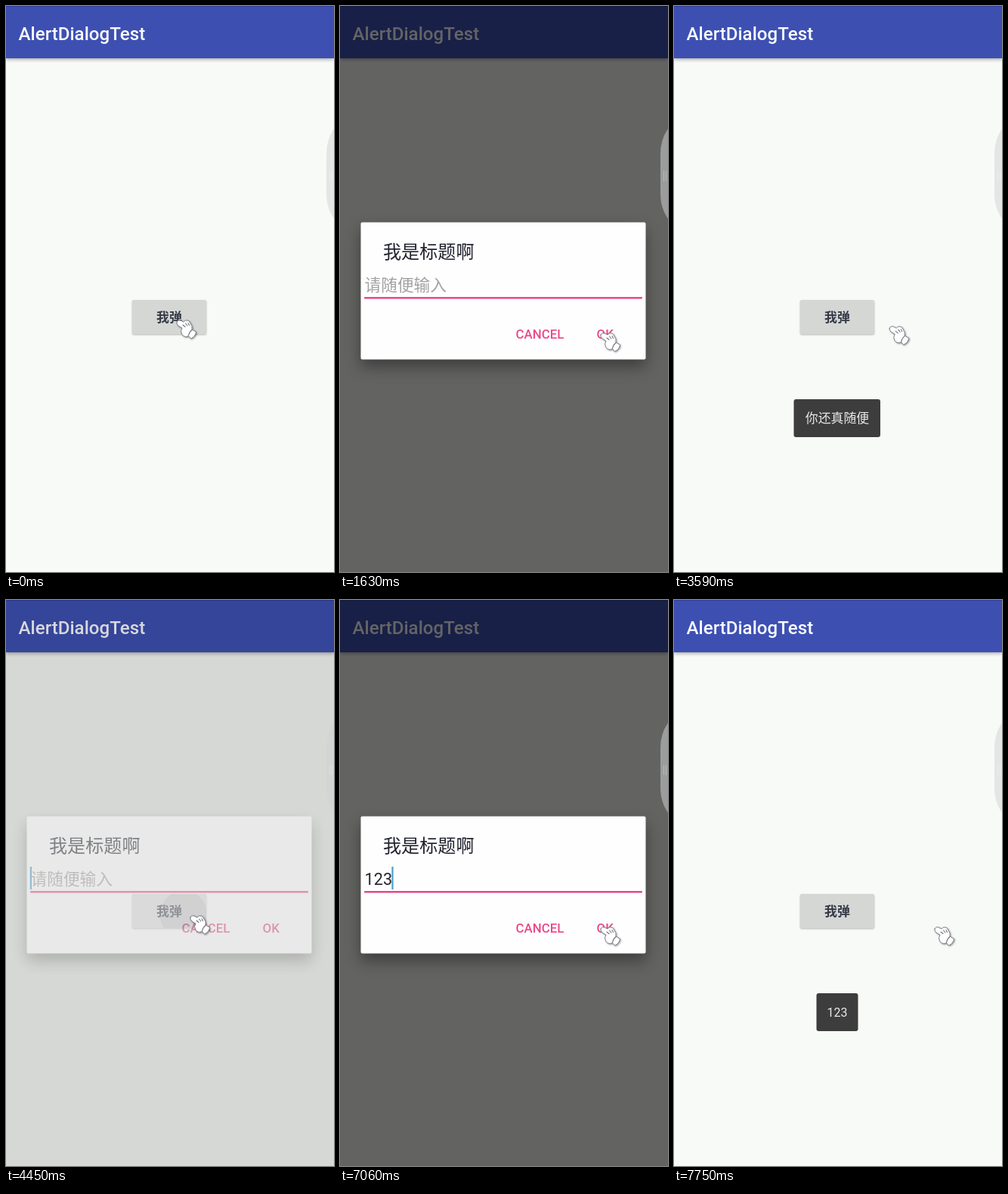
These frames come from a looping animation (434x747 px, 9140 ms). An HTML page:

```html
<!DOCTYPE html>
<html lang="zh-CN">
<head>
<meta charset="utf-8">
<title>AlertDialogTest</title>
<style>
html, body { margin: 0; width: 100%; height: 100%; overflow: hidden; background: #f8faf7; }
svg { display: block; }
text { font-family: Roboto, "Noto Sans CJK SC", "Noto Sans CJK", sans-serif; }
.medium { font-weight: 500; }
.action { font-size: 16.9px; font-weight: 500; fill: #e94a88; }
.bar { filter: drop-shadow(0 2px 2px rgba(0,0,0,.3)); }
.button { filter: drop-shadow(0 1px 1px rgba(0,0,0,.28)); }
.panel { filter: drop-shadow(0 10px 10px rgba(0,0,0,.38)); }
#hand { filter: drop-shadow(1px 1.5px 1px rgba(40,40,60,.5)); }
</style>
</head>
<body>
<svg width="434" height="747" viewBox="0 0 434 747">
  <clipPath id="buttonClip"><rect x="167" y="388" width="98" height="45" rx="2"/></clipPath>
  <clipPath id="okClip"><rect x="319" y="411" width="64" height="44" rx="2"/></clipPath>

  <rect width="434" height="747" fill="#f8faf7"/>
  <g class="bar">
    <rect width="434" height="69" fill="#3d50b2"/>
    <rect width="434" height="1" fill="#2f3f9d"/>
  </g>
  <text class="medium" x="16.5" y="45" font-size="24.1" fill="#fafaff">AlertDialogTest</text>

  <rect class="button" x="167" y="388" width="98" height="45" rx="2" fill="#d5d7d5"/>
  <g clip-path="url(#buttonClip)"><circle id="buttonRipple"/></g>
  <text x="216" y="417" font-size="16.9" font-weight="600" text-anchor="middle" fill="#353a48">我弹</text>

  <rect id="dim" width="434" height="747"/>

  <g id="dialog">
    <rect class="panel" x="27.5" y="285.5" width="377" height="181" rx="2" fill="#fefefe"/>
    <text x="57" y="333" font-size="24.1" fill="#20222e">我是标题啊</text>
    <text id="hint" x="32.5" y="375.5" font-size="21.7" fill="#a2a2a2">请随便输入</text>
    <text id="typed" x="32.5" y="376" font-size="21.7" fill="#25262c"></text>
    <rect id="caret" y="352" width="2.2" height="30" fill="#4a9fce"/>
    <rect x="32" y="384" width="368" height="2.6" rx="1" fill="#ec4687"/>
    <g clip-path="url(#okClip)"><circle id="okRipple"/></g>
    <text class="action" x="232.5" y="439">CANCEL</text>
    <text class="action" x="339.5" y="439">OK</text>
  </g>

  <g id="toast">
    <rect id="toastBox" y="519" height="50" rx="3" fill="#3c3d3c"/>
    <text id="toastText" x="216" text-anchor="middle" fill="#e9e9e9"></text>
  </g>

  <rect x="424" y="151" width="60" height="141" rx="44" fill="#d2d2d4" fill-opacity=".51"/>
  <path d="M428.5 218v13M431.5 218v13" stroke="#fff" stroke-opacity=".3"/>

  <g id="hand" stroke="#74747c" stroke-linejoin="round" stroke-linecap="round">
    <path fill="#fff" stroke-width=".9" d="M1 4Q2 1 6 2L10 4Q12 1 15 2Q18 2 19 6Q22 9 21 14L26.500 17Q26 23 19.500 26L16.500 22.500Q11 25 8 20.500Q5 16 8 12L3 9Q0 6 1 4Z"/>
    <path fill="none" stroke-width="1.100" d="M9 8l3 2.500M12.500 6l2.500 3M16 5.500l1.500 3M16.500 22q1-5 4.500-7.500"/>
  </g>
</svg>
<script>
const LOOP = 9140;
const $ = id => document.getElementById(id);
const set = (id, attrs) => {
  for (const key in attrs) $(id).setAttribute(key, attrs[key]);
};
const progress = (t, start, length) => Math.min(1, Math.max(0, (t - start) / length));
const easeOut = p => 1 - (1 - p) ** 2;
const easeInOut = p => p * p * (3 - 2 * p);

// open and close times of the two dialogs
const dialogs = [{ open: 340, close: 1850 }, { open: 4410, close: 7240 }];
const toasts = [
  { start: 1905, end: 3960, text: '你还真随便', x: 158.5, width: 114.5, size: 16.9, y: 550 },
  { start: 7295, end: LOOP, text: '123', x: 188.5, width: 55, size: 16, y: 550 }
];
const typing = [[5450, '1'], [5940, '12'], [6190, '123']];
const BLINK = 430;

// start, duration, destination
const moves = [[700, 590, 344, 430], [3080, 910, 243, 415], [6120, 840, 344, 430]];

function handAt(t) {
  let [x, y] = [225, 413];
  for (const [start, length, toX, toY] of moves) {
    const p = easeInOut(progress(t, start, length));
    x += (toX - x) * p;
    y += (toY - y) * p;
  }
  return [x, y];
}

function ripple(id, t, starts, x, y, size) {
  const start = starts.findLast(s => t >= s) ?? -LOOP;
  const grow = easeOut(progress(t, start, 300));
  set(id, {
    cx: x, cy: y, r: size * grow,
    opacity: 0.09 * (1 - progress(t, start + 150, 300))
  });
}

function drawDialog(t) {
  const { open, close } = dialogs.findLast(d => t >= d.open) ?? { open: LOOP, close: LOOP };
  const leaving = progress(t, close, 170);
  const shown = easeOut(progress(t, open, 150)) * (1 - leaving);
  set('dim', { opacity: 0.6 * progress(t, open, 180) * (1 - leaving) });
  set('dialog', { opacity: shown });

  const [lastKey, text] = typing.findLast(k => t >= k[0]) ?? [open, ''];
  $('typed').textContent = text;
  set('hint', { opacity: text ? 0 : 1 });
  set('caret', {
    x: 31.8 + text.length * 12.2,
    opacity: Math.floor((t - lastKey) / BLINK) % 2 ? 0 : 1
  });
}

function drawToast(t) {
  const toast = toasts.find(o => t >= o.start && t < o.end + 240);
  set('toast', { opacity: 0 });
  if (!toast) return;
  const fade = easeOut(progress(t, toast.start, 400)) * (1 - progress(t, toast.end, 240));
  set('toast', { opacity: fade });
  set('toastBox', { x: toast.x, width: toast.width });
  set('toastText', { y: toast.y, 'font-size': toast.size });
  $('toastText').style.fontStretch = toast.text === '123' ? 'condensed' : 'normal';
  $('toastText').textContent = toast.text;
}

function draw(t) {
  ripple('buttonRipple', t, [230, 4380], 235, 415, 75);
  ripple('okRipple', t, [1790, 7180], 348, 432, 42);
  drawDialog(t);
  drawToast(t);
  set('hand', { transform: `translate(${handAt(t)})` });
}

const began = performance.now();
function tick() {
  draw((performance.now() - began) % LOOP);
  requestAnimationFrame(tick);
}
tick();
</script>
</body>
</html>
```
